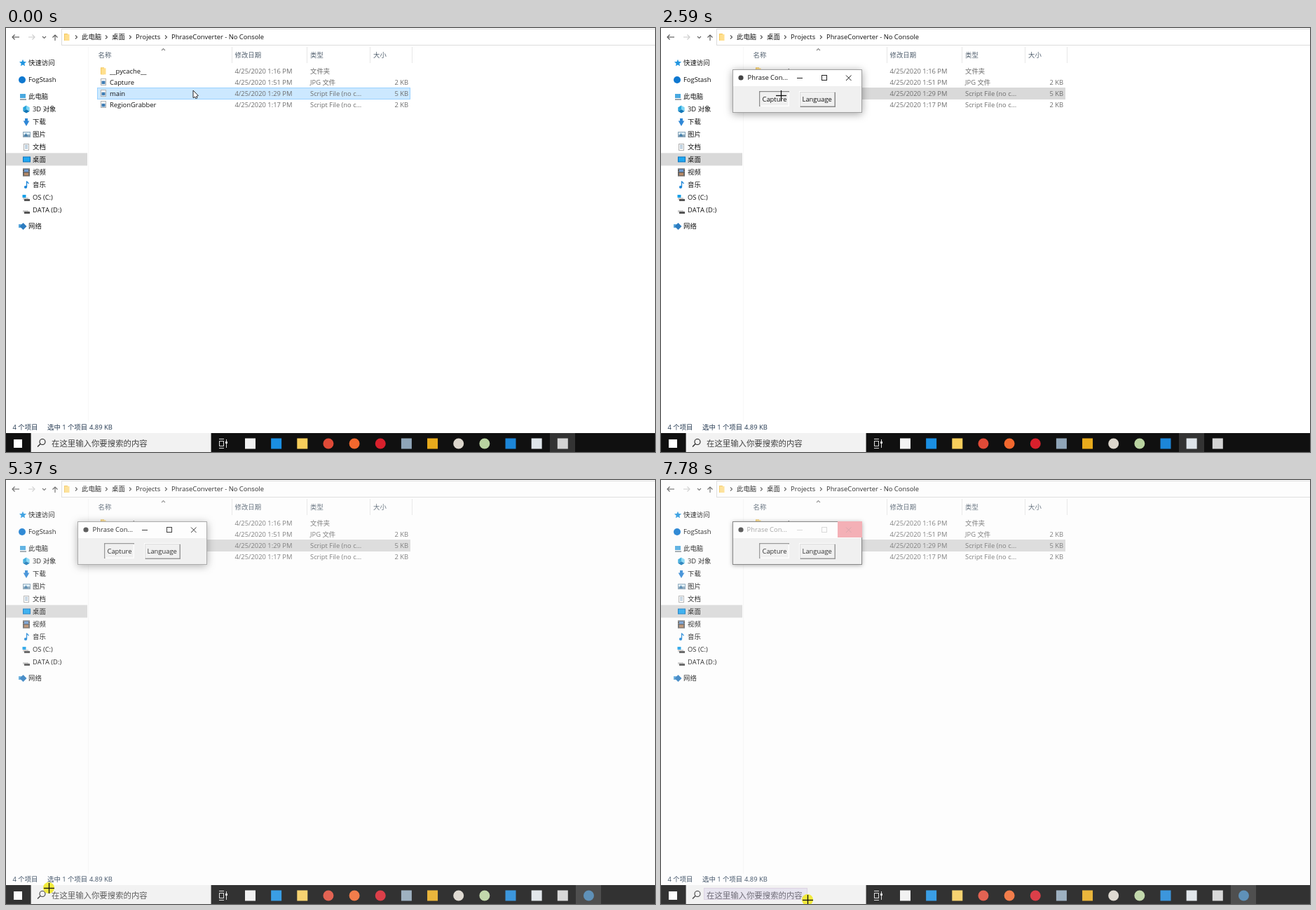
These frames come from a looping animation (926 px wide and 605 px high, 8 s). An HTML page with a canvas:

```html
<!DOCTYPE html>
<html lang="zh-CN">
<head>
<meta charset="utf-8">
<title>Desktop</title>
<style>
html, body { margin: 0; width: 100%; height: 100%; overflow: hidden; background: #fff; }
canvas { display: block; width: 926px; height: 605px; }
</style>
</head>
<body>
<canvas id="stage" width="926" height="605"></canvas>
<script>
const W = 926, H = 605, LOOP = 8000;
const FACE = '"Open Sans", "Noto Sans CJK SC", "Noto Sans CJK", "Noto Sans", sans-serif';
const screen2d = document.getElementById('stage').getContext('2d');
const layer = document.createElement('canvas');
layer.width = W;
layer.height = H;
let g = screen2d;

const clamp = v => Math.max(0, Math.min(1, v));
const ramp = (t, a, b) => clamp((t - a) / (b - a));
const easeOut = p => 1 - (1 - p) ** 3;

// --- pointer motion: glides with an optional sideways bend

const move = (start, end, x, y, bendX = 0, bendY = 0) => ({ start, end, x, y, bendX, bendY });
const HOME = { x: 267, y: 89 };
const MOVES = [
  move(1415, 1880, 171, 96, 0, 8),
  move(3070, 3370, 200, 466, 35, 0),
  move(3530, 3600, 170, 513),
  move(3600, 4360, 70, 579),
  move(4360, 4970, 61, 582),
  move(5540, 7780, 209, 599, 0, 8)
];

function pointer(t) {
  let { x, y } = HOME;
  for (const m of MOVES) {
    if (t < m.start) break;
    const p = ramp(t, m.start, m.end), arc = Math.sin(Math.PI * p), q = p + .05 * arc;
    x += (m.x - x) * q + m.bendX * arc;
    y += (m.y - y) * q + m.bendY * arc;
  }
  return [x, y];
}

// --- drawing helpers

function rect(x, y, w, h, c) { g.fillStyle = c; g.fillRect(x, y, w, h); }

function frame(x, y, w, h, c) {
  g.strokeStyle = c;
  g.lineWidth = 1;
  g.strokeRect(x + .5, y + .5, w - 1, h - 1);
}

function disc(x, y, r, c) {
  g.fillStyle = c;
  g.beginPath();
  g.arc(x, y, r, 0, 7);
  g.fill();
}

function line(x1, y1, x2, y2, c, w = 1) {
  g.strokeStyle = c;
  g.lineWidth = w;
  g.beginPath();
  g.moveTo(x1, y1);
  g.lineTo(x2, y2);
  g.stroke();
}

// Polygon around a centre; the radius may depend on the corner
function ngon(x, y, n, radius, turn, c) {
  g.fillStyle = c;
  g.beginPath();
  for (let i = 0; i < n; i++) {
    const a = turn + i * 2 * Math.PI / n, r = radius(i);
    g.lineTo(x + r * Math.cos(a), y + r * Math.sin(a));
  }
  g.fill();
}

const RIGHT = 0, DOWN = Math.PI / 2, LEFT = Math.PI, UP = -Math.PI / 2;

function chevron(x, y, dir, r, c) {
  g.strokeStyle = c;
  g.lineWidth = 1.1;
  g.beginPath();
  for (const [a, b] of [[-r, -r], [0, 0], [-r, r]]) {
    g.lineTo(x + a * Math.cos(dir) - b * Math.sin(dir), y + a * Math.sin(dir) + b * Math.cos(dir));
  }
  g.stroke();
}

function shaftArrow(x, y, dir, len, c) {
  line(x, y, x - len * Math.cos(dir), y - len * Math.sin(dir), c, 1.1);
  chevron(x, y, dir, 3.5, c);
}

// y is the optical centre of the line
function text(s, x, y, c = '#111', size = 9.4, align = 'left') {
  g.font = size + 'px ' + FACE;
  g.fontKerning = 'none';
  g.textAlign = align;
  g.fillStyle = c;
  g.fillText(s, x, y + size * .37);
}

function folder(x, y) {
  rect(x, y, 5, 10, '#f3c65a');
  rect(x + 1, y + 1, 6.5, 9, '#ffdf8d');
}

function page(x, y) {
  rect(x, y, 8, 10, '#fff');
  frame(x, y, 8, 10, '#b0b0b0');
}

// --- file manager

function addressBar() {
  shaftArrow(9, 13, LEFT, 10, '#555');
  shaftArrow(41, 13, RIGHT, 9, '#ccc');
  shaftArrow(70, 10, UP, 8, '#555');
  chevron(54.5, 14.5, DOWN, 2.5, '#666');
  frame(79, 1, W, 24, '#dcdcdc');
  folder(83, 8);
  let x = 101.5;
  for (const [s, gap] of [['此电脑', 43], ['桌面', 34], ['Projects', 51], ['PhraseConverter - No Console', 0]]) {
    chevron(x, 13, RIGHT, 2.5, '#555');
    text(s, x + 6.6, 13);
    x += gap;
  }
}

function drive(y) {
  rect(24, y - 1, 8, 3, '#d0d0d0');
  rect(26, y + 1, 8, 3, '#555');
}

const ICONS = {
  star(y) { ngon(24, y, 10, i => i % 2 ? 2.4 : 5.3, UP, '#2296e0'); },
  cloud(y) { disc(23, y, 5, '#0f78d0'); },
  computer(y) {
    rect(20, y - 4, 8, 6, '#4aa9e0');
    rect(20, y + 3, 9, 2, '#9aa4ab');
  },
  cube(y) {
    ['#1277b8', '#2aa5dc', '#7fd6f5'].forEach((c, k) => {
      const a = Math.PI / 6 + k * Math.PI * 2 / 3;
      const corner = [0, 5.4, 5.4, 5.4];
      g.fillStyle = c;
      g.beginPath();
      corner.forEach((r, i) => g.lineTo(29 + r * Math.cos(a + (i - 1) * Math.PI / 3), y + r * Math.sin(a + (i - 1) * Math.PI / 3)));
      g.fill();
    });
  },
  download(y) {
    rect(27, y - 5, 4, 5, '#2f87d6');
    ngon(29, y + 1, 3, () => 5, DOWN, '#2f87d6');
  },
  picture(y) {
    rect(24, y - 4, 11, 8, '#8ba6b9');
    rect(25, y - 3, 9, 3, '#d9ecf7');
    ngon(28.5, y + 1, 3, () => 3, UP, '#3f7ba8');
  },
  document(y) {
    page(25, y - 5);
    for (let i = 0; i < 3; i++) rect(27, y - 3 + i * 2, 4, .8, '#6d96b8');
  },
  desktop(y) {
    rect(24, y - 4.5, 11, 8, '#0b73bd');
    rect(25, y - 3.5, 9, 6, '#22a7f0');
  },
  film(y) {
    rect(24, y - 5.5, 10, 11, '#444');
    rect(26, y - 4.5, 6, 4, '#6e9bd1');
    rect(26, y + .5, 6, 4, '#b78a68');
    for (let i = 0; i < 8; i++) rect(i % 2 ? 32.5 : 24.5, y - 4.7 + (i >> 1) * 2.6, 1, 1.2, '#ddd');
  },
  music(y) {
    disc(28, y + 3, 2.1, '#1d86d8');
    line(29.5, y + 3, 29.5, y - 5.5, '#1d86d8', 1.3);
    line(29.5, y - 5, 32.5, y - 2, '#1d86d8', 1.3);
  },
  system(y) {
    drive(y + 1);
    rect(23.5, y - 4, 5, 4, '#18a0e8');
  },
  drive(y) { drive(y + 1); },
  network(y) {
    rect(18, y - 3, 6, 5, '#5aa8dc');
    ngon(24.5, y, 4, () => 5, 0, '#2d7cc0');
  }
};

const PLACES = [['3D 对象', 'cube'], ['下载', 'download'], ['图片', 'picture'], ['文档', 'document'],
  ['桌面', 'desktop'], ['视频', 'film'], ['音乐', 'music'], ['OS (C:)', 'system'], ['DATA (D:)', 'drive']];

function sidebar() {
  rect(117, 27, 1, 535, '#f7f7f7');
  rect(0, 178.4, 116, 18, '#d9d9d9');
  const entry = (s, icon, x, y) => { ICONS[icon](y); text(s, x, y); };
  entry('快速访问', 'star', 32, 50);
  entry('FogStash', 'cloud', 32, 74);
  entry('此电脑', 'computer', 32, 98);
  PLACES.forEach(([s, icon], i) => entry(s, icon, 38, 116 + i * 18));
  entry('网络', 'network', 32, 283);
}

const FILES = [
  ['__pycache__', '1:16', '文件夹', ''],
  ['Capture', '1:51', 'JPG 文件', '2 KB'],
  ['main', '1:29', 'Script File (no c...', '5 KB'],
  ['RegionGrabber', '1:17', 'Script File (no c...', '2 KB']
];

function fileList(focused) {
  chevron(224.5, 29.5, UP, 2.5, '#888');
  for (const [s, x, edge] of [['名称', 131.5, 322], ['修改日期', 326.5, 429], ['类型', 434, 519], ['大小', 524, 579]]) {
    text(s, x, 38.5, '#52606f');
    rect(edge, 27, 1, 23, '#e7e7e7');
  }
  rect(130, 85, 447, 17, focused ? '#cce8ff' : '#d9d9d9');
  if (focused) frame(130, 85, 447, 17, '#99d1ff');

  const soft = '#6d6d6d';
  FILES.forEach(([name, time, kind, size], i) => {
    const y = 61.3 + i * 16.2;
    if (size) {
      page(135, Math.round(y - 5.5));
      rect(136.5, y - 2, 5, 4.5, '#3f7db4');
    } else folder(135, y - 5);
    text(name, 148, y);
    text('4/25/2020 ' + time + ' PM', 326.5, y, soft);
    text(kind, 434, y, soft);
    text(size, 574, y, soft, 9.4, 'right');
  });
}

function status() {
  const y = 569.5, c = '#22374f';
  text('4 个项目', 9.5, y, c);
  text('选中 1 个项目', 59, y, c);
  text('4.89 KB', 119, y, c);
}

// --- taskbar

const APPS = ['#f2f2f2', '#1a8fe3', '#f8ce5b', '#df4a37', '#f2682e', '#d8202c', '#8fa5b8',
  '#e8ab1c', '#dcd6cc', '#b9d3a0', '#1c86d8', '#dfe5ea', '#d4d4d4', '#4580ae'];
const SHAPES = 'sssooossoossso';
const FILES_APP = 2, TOOL_APP = 11, RECORDER_APP = 12, OVERLAY_APP = 13;

function activeApp(t) {
  if (t < 560) return RECORDER_APP;
  if (t < 835) return FILES_APP;
  return t < 2670 ? TOOL_APP : OVERLAY_APP;
}

function taskbar(active) {
  rect(0, 578, W, 27, '#101010');
  rect(11, 587, 12, 12, '#fff');
  rect(35.6, 578, 257, 27, '#f2f2f2');
  g.strokeStyle = '#222';
  g.lineWidth = 1.1;
  g.beginPath();
  g.arc(52, 590.5, 4, 0, 7);
  g.stroke();
  line(49, 593.5, 45, 597.5, '#222', 1.2);
  text('在这里输入你要搜索的内容', 65, 592.7, '#444', 11.4);

  frame(304, 589, 7, 8, '#ddd');
  for (const y of [586, 599]) rect(304, y, 7, 1, '#ddd');
  rect(314, 587, 1, 12, '#ddd');
  rect(313, 590, 3, 3, '#ddd');

  APPS.forEach((c, i) => {
    const x = 348.5 + i * 37.15;
    if (i === active) rect(Math.round(x - 18), 578, 36, 27, '#333');
    if (i === OVERLAY_APP && i !== active) return;
    if (SHAPES[i] === 'o') disc(x, 593, 7.5, c);
    else rect(x - 7.5, 585.5, 15, 15, c);
  });
}

// --- tool window

function button(s, x, y, w, h, sunk) {
  const dark = '#8a8a8a', lite = '#fff', top = sunk ? dark : lite, low = sunk ? lite : dark;
  rect(x, y, w, h, top);
  rect(x + 1.5, y + 1.5, w - 1.5, h - 1.5, low);
  rect(x + 1.5, y + 1.5, w - 3, h - 3, '#f0f0f0');
  const d = sunk ? .5 : -.3;
  text(s, x + w / 2 + d, y + h / 2 + d, '#111', 9.4, 'center');
}

function paintWindow(sunk, idle) {
  const ink = idle ? '#d4d4d4' : '#222', mark = idle ? '#d39aa0' : ink;
  g.save();
  g.shadowColor = 'rgba(0,0,0,.36)';
  g.shadowBlur = idle ? 6 : 11;
  g.shadowOffsetY = idle ? 1 : 2;
  rect(102, 59, 185, 62, '#f0f0f0');
  g.restore();
  rect(102, 59, 185, 24, '#fff');
  frame(102, 59, 185, 62, idle ? '#777' : '#a0a0a0');
  if (idle) rect(252, 59, 35, 23, '#f4a4ac');
  disc(114, 71, 3.6, '#444');
  text('Phrase Con...', idle ? 122.5 : 123.5, 71, idle ? '#999' : '#111');
  rect(194, 71, 8, 1, ink);
  frame(229, 67, 8, 8, ink);
  line(264, 67.5, 271.5, 75, mark);
  line(271.5, 67.5, 264, 75, mark);
  button('Capture', 140, 90, 43, 22, sunk);
  button('Language', 197, 90, 52, 23, false);
}

function toolWindow(t) {
  const p = ramp(t, 835, 1140);
  if (!p) return;
  g = layer.getContext('2d');
  g.clearRect(0, 0, W, H);
  paintWindow(t >= 2130, t >= 7780);
  g = screen2d;
  const k = .9 + .1 * easeOut(p);
  g.save();
  g.globalAlpha = p;
  g.translate(194, 90);
  g.scale(k, k);
  g.drawImage(layer, -194, -90);
  g.restore();
}

// --- pointers

function arrow(x, y) {
  line(x + 3, y + 7, x + 5, y + 11.5, '#111', 3);
  g.beginPath();
  g.moveTo(x, y);
  g.lineTo(x, y + 10.5);
  g.lineTo(x + 7.3, y + 7.5);
  g.closePath();
  g.fillStyle = '#fff';
  g.fill();
  g.strokeStyle = '#111';
  g.lineWidth = .9;
  g.stroke();
  line(x + 2.7, y + 6.5, x + 4.7, y + 11, '#fff', 1.3);
}

function cross(x, y) {
  x = Math.round(x) + .5;
  y = Math.round(y) + .5;
  line(x - 7.5, y, x + 7.5, y, '#111', 1.3);
  line(x, y - 7.5, x, y + 7.5, '#111', 1.3);
}

const within = (t, a, b) => t >= a && t < b;

function draw(t) {
  rect(0, 0, W, H, '#fff');
  addressBar();
  sidebar();
  fileList(t < 835);
  status();
  taskbar(activeApp(t));
  if (within(t, 835, 1140)) rect(408, 603, 30, 2, 'rgba(120,120,120,' + .6 * (1 - ramp(t, 835, 1140)) + ')');
  toolWindow(t);

  // Capture veil over the whole screen
  rect(0, 0, W, H, 'rgba(240,240,240,' + .15 * ramp(t, 2590, 2820) + ')');

  const [x, y] = pointer(t);
  if (t >= 5560) {
    rect(61, 582, x - 61, y - 582, 'rgba(185,170,225,.2)');
    frame(61, 582, Math.max(1, x - 61), Math.max(1, y - 582), 'rgba(190,160,190,.25)');
  }
  if (within(t, 320, 560) || within(t, 2130, 2360) || t >= 5370) disc(x, y, 8, 'rgba(240,232,20,.82)');
  (t < 2590 ? arrow : cross)(x, y);
}

const start = performance.now();
function tick(now) {
  draw(Math.max(0, now - start) % LOOP);
  requestAnimationFrame(tick);
}
draw(0);
requestAnimationFrame(tick);
</script>
</body>
</html>
```
